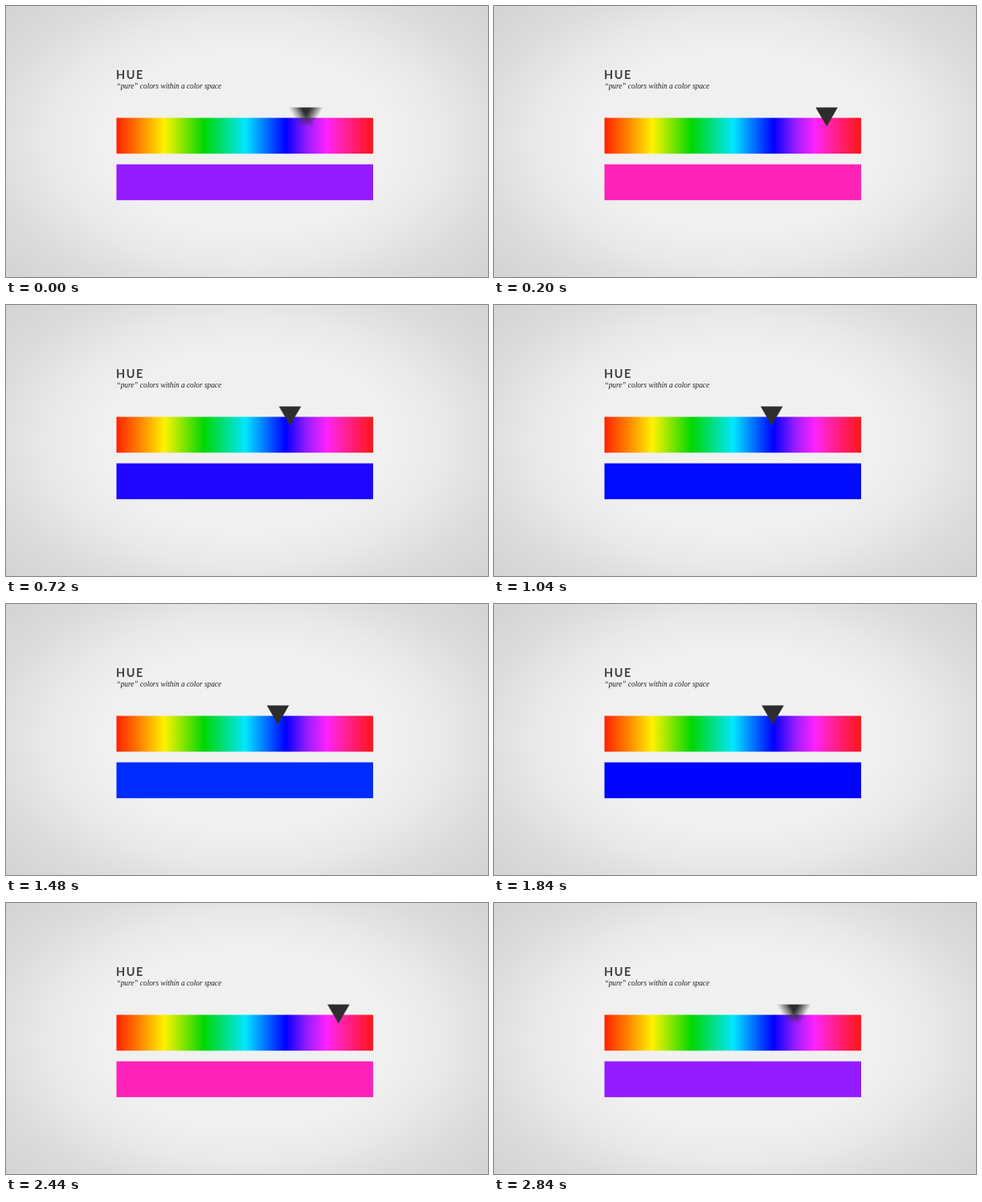
These frames come from a looping animation (600x338 px, 2880 ms). An HTML page with a canvas:

```html
<!DOCTYPE html>
<html lang="en">
<head>
<meta charset="utf-8">
<title>Hue</title>
<style>
  html, body { margin: 0; width: 100%; height: 100%; overflow: hidden; }
  body {
    position: relative;
    background: radial-gradient(400px 250px at 300px 169px,
      #f1f1f1 0%, #f0f0f0 45%, #e9e9e9 62%, #dcdcdc 80%, #d4d4d4 100%);
  }
  svg, canvas { position: absolute; left: 0; top: 0; display: block; }
  .title { font: 700 14.5px Lato, sans-serif; letter-spacing: 1.5px; fill: #404040; }
  .note { font: italic 9.3px "Liberation Serif", serif; fill: #222; }
</style>
</head>
<body>
<svg width="600" height="338">
  <defs>
    <linearGradient id="spectrum" gradientUnits="userSpaceOnUse" x1="137.5" x2="457"></linearGradient>
  </defs>
  <text class="title" x="137" y="91.3">HUE</text>
  <text class="note" x="137.5" y="103">“pure” colors within a color space</text>
  <rect x="137.5" y="139.5" width="319.5" height="44.7" fill="url(#spectrum)"/>
  <rect id="swatch" x="137.5" y="197.5" width="319.5" height="44.7"/>
</svg>
<canvas id="slider" width="600" height="338"></canvas>
<script>
const LEFT = 137.5, RIGHT = 457;
const STEP = 40, FRAMES = 72;
const SHUTTER = 20, SAMPLES = 15;

const stops = [
  [LEFT, [255, 34, 0]],
  [166, [255, 128, 0]],
  [197, [255, 242, 0]],
  [246, [0, 215, 0]],
  [298, [0, 230, 255]],
  [348, [0, 0, 255]],
  [374, [148, 27, 255]],
  [399, [255, 34, 255]],
  [414, [255, 34, 184]],
  [RIGHT, [255, 22, 22]]
];

const rgb = c => `rgb(${c.map(Math.round)})`;
const lerp = (a, b, u) => a + (b - a) * u;

function ease(t, from, to) {
  const u = Math.min(1, Math.max(0, (t - from) / (to - from)));
  return u * u * (3 - 2 * u);
}

function hueAt(x) {
  const i = Math.max(1, stops.findIndex(s => s[0] >= x));
  const [x0, a] = stops[i - 1], [x1, b] = stops[i];
  return a.map((v, k) => lerp(v, b[k], (x - x0) / (x1 - x0)));
}

// Quick arrival at pink, a glide back to indigo, then a slow drift to blue.
function position(t) {
  return 415.1 - 41.1 * Math.exp(-t / 53)
    - 62.7 * ease(t, 370, 750)
    - 13.9 * ease(t, 750, 1340);
}

document.getElementById("spectrum").innerHTML = stops.map(([x, c]) =>
  `<stop offset="${(x - LEFT) / (RIGHT - LEFT)}" stop-color="${rgb(c)}"/>`).join("");

const swatch = document.getElementById("swatch");
const ctx = document.getElementById("slider").getContext("2d");
ctx.globalCompositeOperation = "lighter";
ctx.fillStyle = "#333";

function drawSlider(t) {
  ctx.clearRect(0, 0, 600, 338);
  ctx.globalAlpha = 1 / SAMPLES;
  for (let i = 0; i < SAMPLES; i++) {
    const x = position(t + SHUTTER * (i / (SAMPLES - 1) - 0.5));
    ctx.beginPath();
    ctx.moveTo(x - 13.8, 126.6);
    ctx.lineTo(x + 13.8, 126.6);
    ctx.lineTo(x, 150.3);
    ctx.fill();
  }
}

function render(now) {
  const n = Math.floor(now / STEP) % FRAMES;
  const t = Math.min(n, FRAMES - 1 - n) * STEP;
  swatch.setAttribute("fill", rgb(hueAt(position(t))));
  drawSlider(t);
}

const start = performance.now();
function tick() {
  render(performance.now() - start);
  requestAnimationFrame(tick);
}
tick();
</script>
</body>
</html>
```
